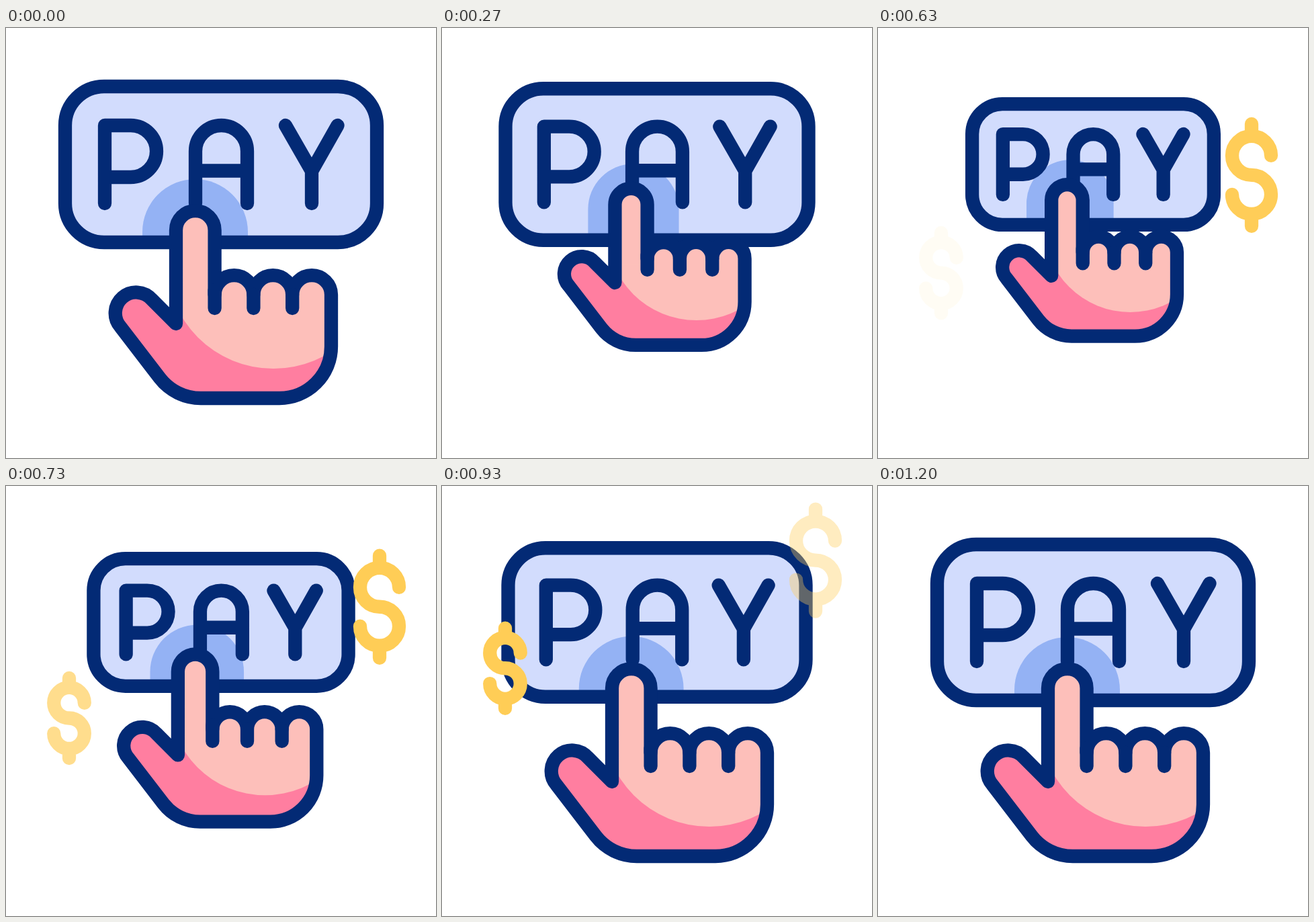
Recreate the animation shown at these times as an HTML page. Size 640 px wide and 640 px high, loop 1.4 s.

```html
<!DOCTYPE html>
<html lang="en">
<head>
<meta charset="utf-8">
<title>Pay button</title>
<style>
  html, body { margin: 0; width: 100%; height: 100%; overflow: hidden; background: #fff; }
  svg { display: block; width: 100vw; height: 100vh; }
  g, .coin { stroke: #032a75; stroke-linecap: round; stroke-linejoin: round; }
  .line { fill: none; }
  .flat { stroke: none; }
  .coin { fill: none; stroke: #ffcd56; opacity: 0; }
</style>
</head>
<body>
<svg viewBox="0 0 640 640">
  <defs>
    <path id="palm" d="M253 440V301a28.8 28.8 0 0 1 57.6 0V397a28.9 28.9 0 0 1 57.8 0a28.9 28.9 0 0 1 57.8 0a28.9 28.9 0 0 1 57.8 0V474A77 77 0 0 1 407 551H290A77 77 0 0 1 228.8 520.9L170.4 444.9A31 31 0 0 1 217 404Z"/>
    <clipPath id="inHand"><use href="#palm"/></clipPath>
  </defs>

  <g id="back"><rect class="flat" x="88" y="87" width="464" height="232" rx="58" fill="#d2dcfd"/></g>
  <path id="ripple" fill="#94b2f4"/>
  <g id="button" class="line">
    <rect x="88" y="87" width="464" height="232" rx="58"/>
    <path d="M147 261V145H185.5a38.5 38.5 0 0 1 0 77H147"/>
    <path d="M282 261V183.5a38.5 38.5 0 0 1 77 0V261M282 212.5H359"/>
    <path d="M416 145L455 213L493.5 145M455 213V261"/>
  </g>

  <g id="hand">
    <use class="flat" href="#palm" fill="#ff7ea0"/>
    <g class="flat" clip-path="url(#inHand)" fill="#fdbfba">
      <circle class="flat" cx="398" cy="348" r="159"/>
      <rect class="flat" x="250" y="260" width="61" height="148"/>
    </g>
    <use class="line" href="#palm"/>
    <path class="line" d="M310.6 390V417M368.4 397V417M426.2 397V417"/>
  </g>

  <path class="coin" d="M29 -29A29 29 0 1 0 0 0A29 29 0 1 1 -29 29M0 -76V-58M0 58V76"/>
  <path class="coin" d="M29 -29A29 29 0 1 0 0 0A29 29 0 1 1 -29 29M0 -76V-58M0 58V76"/>
</svg>
<script>
const LOOP = 1400, FPS = 30, LINE = 20.3;
const $ = id => document.getElementById(id);
const back = $('back'), button = $('button'), hand = $('hand'), ripple = $('ripple');
const coins = [
  { x: 556, y: 261, size: 1, start: 13 },
  { x: 94, y: 366, size: 0.785, start: 18 }
].map((c, i) => ({ ...c, el: document.querySelectorAll('.coin')[i] }));

// smooth 0..1 between two ticks
function ease(n, from, to) {
  const q = Math.min(1, Math.max(0, (n - from) / (to - from)));
  return q * q * (3 - 2 * q);
}
const pulse = (n, a, peak, b) => ease(n, a, peak) - ease(n, peak, b);

// scale about a point while the line weight stays the same
function zoom(el, s, x, y) {
  el.setAttribute('transform', `translate(${x} ${y}) scale(${s}) translate(${-x} ${-y})`);
  el.setAttribute('stroke-width', LINE / s);
}

function drawRipple(u, bottom) {
  const r = 78.5 - 18 * u, x = 281.5 + 5.7 * u, y = 225 - 37.8 * u + r;
  ripple.setAttribute('d',
    `M${x - r} ${bottom}V${y}a${r} ${r} 0 0 1 ${2 * r} 0V${bottom}Z`);
}

function drawCoin({ el, x, y, size, start }, n) {
  const p = (n - start) / 18;
  el.style.opacity = pulse(p, 0, 0.36, 9) * (1 - ease(p, 0.6, 1));
  el.setAttribute('transform', `translate(${x} ${y - 162.5 * ease(p, 0, 1)}) scale(${size})`);
  el.setAttribute('stroke-width', LINE / size);
}

function draw(ms) {
  const n = Math.floor((Math.floor(ms / 10) * 10 + 5) * FPS / 1000);
  const s = 1 - 0.228 * pulse(n, 5.2, 18, 32);
  zoom(back, s, 320, 203);
  zoom(button, s, 320, 203);
  zoom(hand, 1 - 0.27 * pulse(n, 0, 14, 28), 280, 68);
  drawRipple(pulse(n, 0, 14, 29.7), 203 + 116 * s);
  coins.forEach(c => drawCoin(c, n));
}

const t0 = performance.now();
function tick() {
  draw((performance.now() - t0) % LOOP);
  requestAnimationFrame(tick);
}
tick();
</script>
</body>
</html>
```
